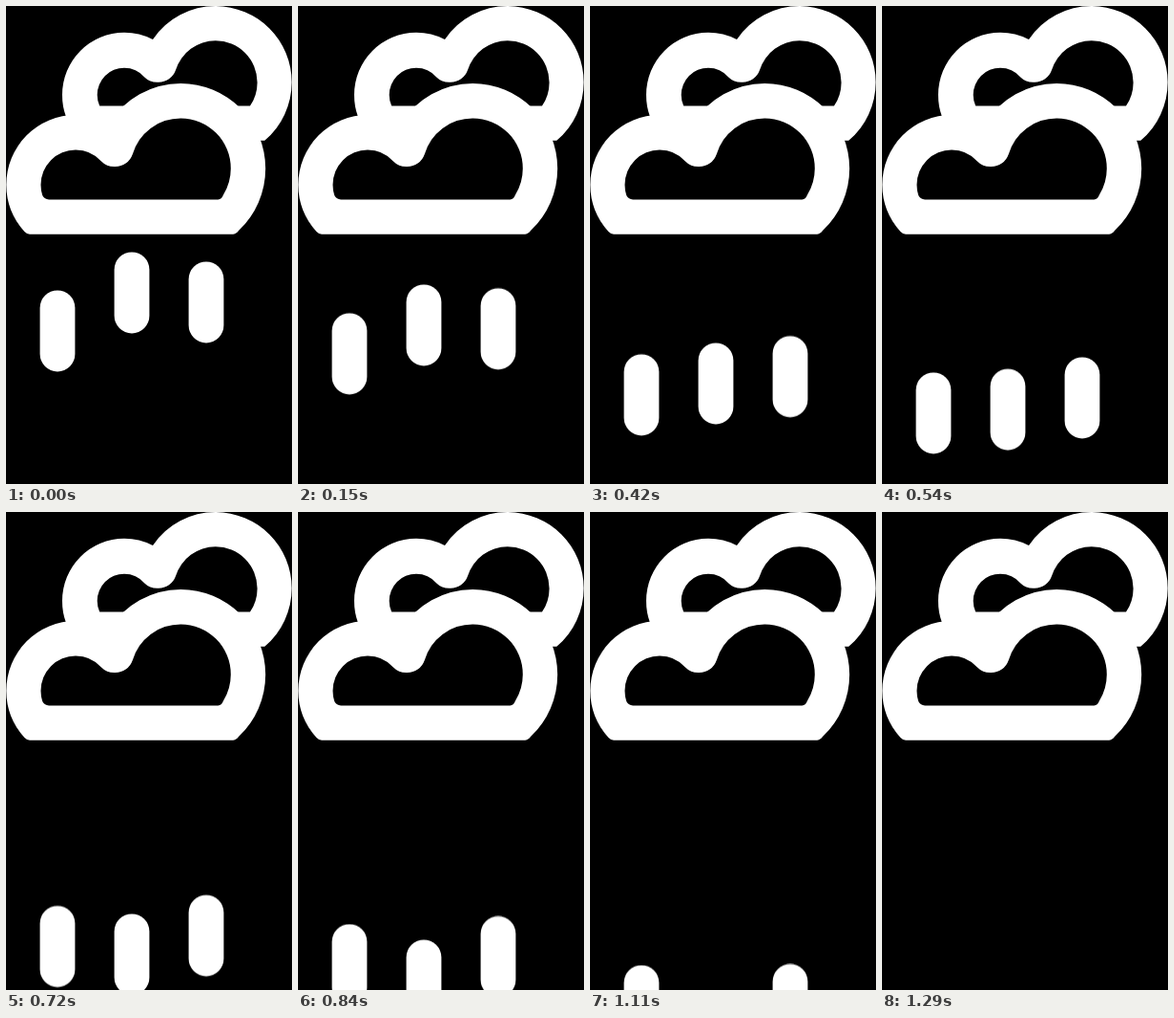
These frames come from a looping animation (300 by 500 pixels, 1350 ms). An HTML page:

```html
<!DOCTYPE html>
<html lang="en">
<head>
<meta charset="utf-8">
<title>Rain</title>
<style>
  html, body { margin: 0; width: 100%; height: 100%; overflow: hidden; background: #000; }
  svg { display: block; width: 300px; height: 500px; }
</style>
</head>
<body>
<svg viewBox="0 0 300 500" fill="#fff">
  <g id="back">
    <path d="M63 116A65.2 65.2 0 0 1 59 93A65.1 65.1 0 0 1 124 27.8A65.2 65.2 0 0 1 154 35
      A79.7 79.7 0 0 1 220 .1A79.7 79.7 0 0 1 299.7 79.8A79.7 79.7 0 0 1 271.3 140.8H108Z"/>
    <path fill="#000" d="M98.2 104.6A28.3 28.3 0 0 1 95.7 93A28.3 28.3 0 0 1 124 64.7A28.3 28.3 0 0 1 145.3 74.4
      A19 19 0 0 0 160 79.8A19 19 0 0 0 178 67.1
      A43.8 43.8 0 0 1 219.8 36.2A43.8 43.8 0 0 1 263.6 80A43.8 43.8 0 0 1 256 104.6Z"/>
  </g>
  <g id="front">
    <path d="M25 238.8Q22 238.8 19.4 236A73 73 0 0 1 .3 187A73 73 0 0 1 73.3 113.9A73 73 0 0 1 108 123
      A89 89 0 0 1 183.2 81A89 89 0 0 1 272.2 170A89 89 0 0 1 244 235Q241 238.8 238 238.8Z"/>
    <path fill="#000" d="M45 202.4Q40.5 202.4 38.2 198A36.5 36.5 0 0 1 36.5 187A36.5 36.5 0 0 1 73 150.5A36.5 36.5 0 0 1 100 162.4
      A19 19 0 0 0 114.5 168A19 19 0 0 0 132.7 155.2
      A52.6 52.6 0 0 1 183.2 117.4A52.6 52.6 0 0 1 235.8 170A52.6 52.6 0 0 1 228 197.5Q226 202.4 222.5 202.4Z"/>
  </g>
  <g id="rain"></g>
</svg>
<script>
  const LOOP = 1350, TICK = 30;
  const drops = [
    { x: 35.6, y: 297.4, fall: 214.8 },
    { x: 113.6, y: 257.4, fall: 305.4 },
    { x: 191.6, y: 267.4, fall: 249.8 }
  ];
  const rain = document.getElementById('rain');

  for (const { x, y, fall } of drops) {
    const drop = document.createElementNS('http://www.w3.org/2000/svg', 'rect');
    const attrs = { x, y, width: 36.8, height: 85, rx: 18.4 };
    for (const name in attrs) drop.setAttribute(name, attrs[name]);
    rain.append(drop);
    drop.animate(
      [{ transform: 'translateY(0)' }, { transform: `translateY(${fall}px)` }],
      { duration: LOOP, iterations: Infinity, easing: `steps(${LOOP / TICK}, end)` }
    );
  }
</script>
</body>
</html>
```
